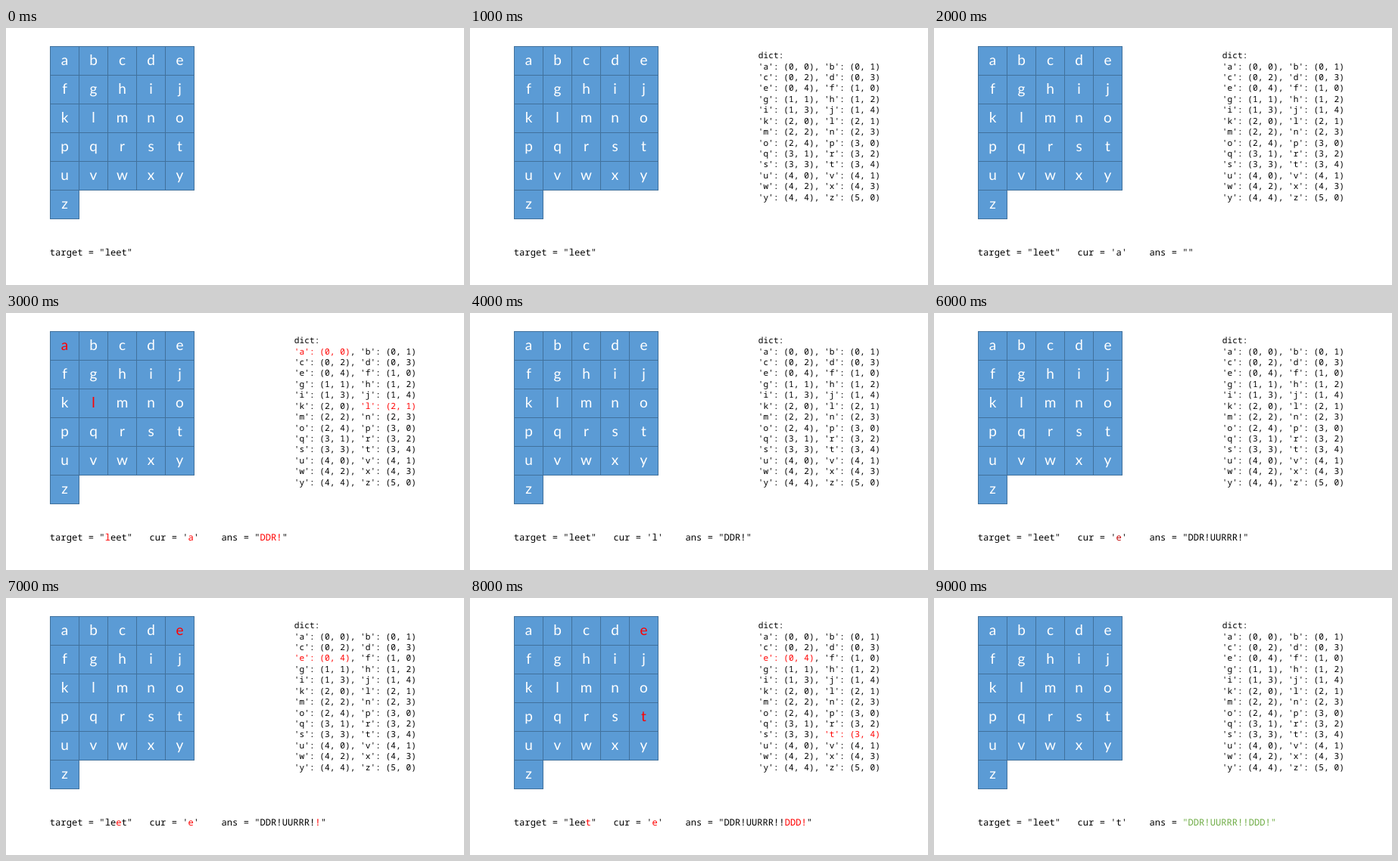
Animation of 605x340 px, one loop 10000 ms. Source, as an HTML page:

```html
<!DOCTYPE html>
<html lang="en">
<head>
<meta charset="utf-8">
<title>Alphabet board path</title>
<style>
  html, body { margin: 0; width: 100%; height: 100%; overflow: hidden; background: #fff; }
  svg { display: block; width: 605px; height: 340px; }
  text { white-space: pre; text-rendering: geometricPrecision; }
  rect { fill: #5b9bd5; stroke: #41719c; shape-rendering: crispEdges; }
  .cell { font: 19px Lato, sans-serif; fill: #fff; text-anchor: middle; }
  .dict { font: 11.2px "Noto Sans Mono", monospace; }
  .line { font: 12.15px "Noto Sans Mono", monospace; }
  .red { fill: #f00; }
  .dark { fill: #c00000; }
  .green { fill: #70ad47; }
</style>
</head>
<body>
<svg viewBox="0 0 605 340"><g id="board"></g><g id="dict"></g><g id="lines"></g></svg>
<script>
const STEP = 1000, CELL = 38, LEFT = 58, TOP = 24;
const TARGET = 'leet';
const letters = [...'abcdefghijklmnopqrstuvwxyz'];

// at: active target index, add: moves appended in this step
const steps = [
  {},
  { dict: true },
  { dict: true, cur: 'a', ans: '' },
  { dict: true, cur: 'a', ans: '', at: 0, add: 'DDR!' },
  { dict: true, cur: 'l', ans: 'DDR!' },
  { dict: true, cur: 'l', ans: 'DDR!', at: 1, add: 'UURRR!' },
  { dict: true, cur: 'e', ans: 'DDR!UURRR!', curClass: 'dark' },
  { dict: true, cur: 'e', ans: 'DDR!UURRR!', at: 2, add: '!' },
  { dict: true, cur: 'e', ans: 'DDR!UURRR!!', at: 3, add: 'DDD!' },
  { dict: true, cur: 't', ans: 'DDR!UURRR!!DDD!', done: true }
];

const $ = id => document.getElementById(id);
const span = (s, cls) => cls ? `<tspan class="${cls}">${s}</tspan>` : s;
const text = (cls, x, y, s) => `<text class="${cls}" x="${x}" y="${y}">${s}</text>`;
const rowOf = i => Math.floor(i / 5);

function drawBoard(active) {
  return letters.map((c, i) => {
    const x = LEFT + i % 5 * CELL, y = TOP + rowOf(i) * CELL;
    return `<rect x="${x + .5}" y="${y + .5}" width="${CELL}" height="${CELL}"/>` +
      text('cell', x + 19.5, y + 25, span(c, active.includes(c) && 'red'));
  }).join('');
}

function drawDict(active) {
  const entry = i => span(`'${letters[i]}': (${rowOf(i)}, ${i % 5})`,
    active.includes(letters[i]) && 'red');
  const rows = ['dict:'];
  for (let i = 0; i < 26; i += 2) rows.push(`${entry(i)}, ${entry(i + 1)}`);
  return rows.map((row, i) => text('dict', 380.8, 40.2 + i * 14.42, row)).join('');
}

function drawLines({ cur, ans, at, add, done, curClass }) {
  const word = [...TARGET].map((c, i) => span(c, i === at && 'red')).join('');
  let out = text('line', 57.8, 301, `target = "${word}"`);
  if (cur) {
    const tint = curClass || (add && 'red');
    const moves = `"${ans}${add ? span(add, 'red') : ''}"`;
    out += text('line', 189.5, 301, `cur = '${span(cur, tint)}'`);
    out += text('line', 284.5, 301, `ans = ${span(moves, done && 'green')}`);
  }
  return out;
}

function render(step) {
  const active = step.add ? [step.cur, TARGET[step.at]] : [];
  $('board').innerHTML = drawBoard(active);
  $('dict').innerHTML = step.dict ? drawDict(active) : '';
  $('lines').innerHTML = drawLines(step);
}

let shown = -1;
function tick() {
  const index = Math.floor(performance.now() / STEP) % steps.length;
  if (index !== shown) render(steps[shown = index]);
  requestAnimationFrame(tick);
}
tick();
</script>
</body>
</html>
```
